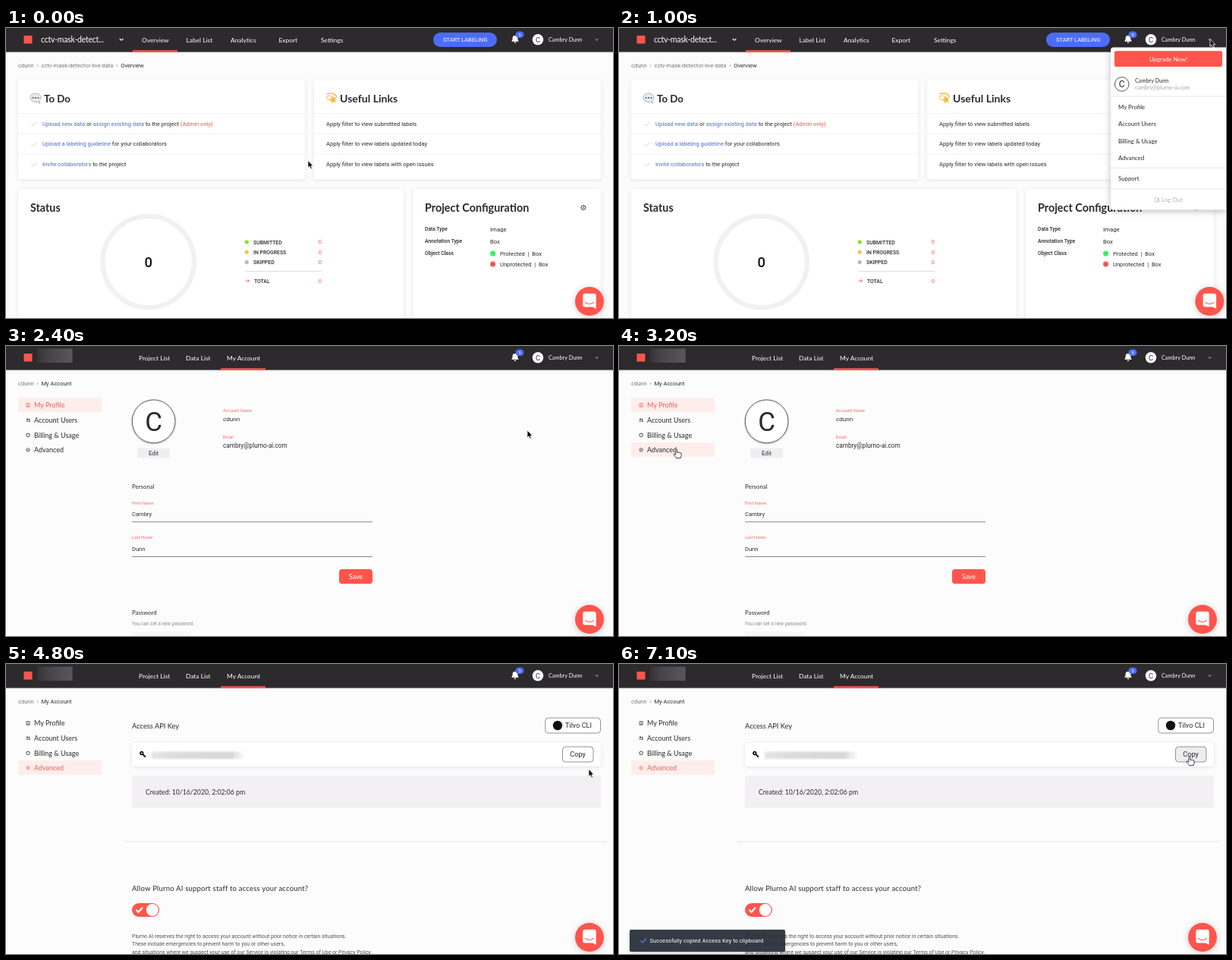
An HTML page that plays this animation: 800x382 px, repeating every 7200 ms.

```html
<!DOCTYPE html>
<html lang="en">
<head>
<meta charset="utf-8">
<title>Access key walkthrough</title>
<style>
html, body { margin: 0; width: 100%; height: 100%; overflow: hidden; background: #fdfcfd; }
svg { display: block; width: 100%; height: 100%; }
text { white-space: pre; }
.l { font-family: Lato, sans-serif; }
.r { font-family: Roboto, sans-serif; }
.card { fill: #fff; filter: drop-shadow(0 1px 2.5px rgba(60, 40, 70, .14)); }
</style>
</head>
<body>
<svg id="stage" viewBox="0 0 800 382" xmlns="http://www.w3.org/2000/svg"></svg>
<script>
const RED = '#ff554c', INK = '#2a292c', BLUE = '#4a69d8', GREY = '#8d8b90', DARK = '#2c2a2d', EDGE = '#8a888d';
const LOOP = 7200, STEP = 100;

const text = cls => (x, y, s, size, fill = INK, extra = '') =>
  `<text class="${cls}" x="${x}" y="${y}" font-size="${size}" fill="${fill}" ${extra}>${s}</text>`;
const lato = text('l'), robo = text('r');
const MID = 'text-anchor="middle"', END = 'text-anchor="end"', MED = 'font-weight="500"', BOLD = 'font-weight="700"';
const rect = (x, y, w, h, fill, extra = '') =>
  `<rect x="${x}" y="${y}" width="${w}" height="${h}" fill="${fill}" ${extra}/>`;
const card = (x, y, w, h) => `<rect class="card" x="${x}" y="${y}" width="${w}" height="${h}" rx="3"/>`;
const dot = (x, y, r, fill, extra = '') => `<circle cx="${x}" cy="${y}" r="${r}" fill="${fill}" ${extra}/>`;
const line = (d, stroke, w = 1, extra = '') =>
  `<path d="${d}" fill="none" stroke="${stroke}" stroke-width="${w}" ${extra}/>`;
const group = (id, body) => `<g id="${id}">${body}</g>`;
const span = (s, fill) => `<tspan fill="${fill}">${s}</tspan>`;
const ROUND = 'stroke-linecap="round" stroke-linejoin="round"';

function topBar() {
  return rect(0, 31, 800, 2, '#efecef') + rect(0, 0, 800, 31.6, DARK) +
    rect(23.5, 10, 11, 10.5, RED) +
    '<path d="M671 9.8c-2.4 0-3.4 1.8-3.4 3.8 0 2.6-.8 3.2-1.5 4.2h9.8c-.7-1-1.5-1.6-1.5-4.2 0-2-1-3.8-3.4-3.8zM669.6 18.6h2.8a1.4 1.4 0 0 1-2.8 0z" fill="#fff"/>' +
    rect(671.5, 4.5, 11, 8.5, '#4d6cf5', 'rx="4.2"') + robo(677, 11.2, '5', 6.2, '#fff', MID) +
    dot(701, 15.3, 7.2, '#fff') + robo(701, 18.7, 'C', 9.4, INK, MID) +
    lato(715, 18, 'Cambry Dunn', 7.3, '#fff') +
    line('M776.9 14.5l1.7 1.7 1.7-1.7', '#e4e3e5', .9);
}

function nav(items, active) {
  const [x, w] = active;
  return items.map(([at, s]) => lato(at, 18.7, s, 8.4, '#fff')).join('') + rect(x, 29.3, w, 2.6, RED);
}

function crumbs(...parts) {
  const last = parts.pop();
  return robo(16, 51.8, parts.map(p => span(p + '  ›  ', '#77757a')).join('') + span(last, INK), 7.55);
}

function taskList() {
  const link = s => span(s, BLUE);
  const rows = [
    link('Upload new data') + ' or ' + link('assign existing data') + ' to the project ' + span('(Admin only)', '#e8574f'),
    link('Upload a labeling guideline') + ' for your collaborators',
    link('Invite collaborators') + ' to the project'
  ];
  const filters = ['submitted labels', 'labels updated today', 'labels with open issues'];
  return rows.map((s, i) => {
    const y = 112.5 + i * 26.7;
    return line(`M16 ${y}H394M406 ${y}H784`, '#f2f0f3') +
      line(`M33.5 ${y + 14}l2.4 2.4 4.8-5`, '#d3d6d8') +
      robo(48, y + 16.2, s, 7.55) +
      robo(422, y + 16.2, 'Apply filter to view ' + filters[i], 7.57);
  }).join('');
}

function emoji() {
  const bubble = '<path d="M39 86.2c4.2 0 7 2.4 7 5.6 0 1.9-.9 3.4-2.4 4.4l1.4 3-4.1-1.9c-5.3.6-8.9-1.9-8.9-5.5 0-3.2 2.8-5.6 7-5.6z" fill="#e8ecee" stroke="#98a2a8" stroke-width=".8"/>' +
    [35.6, 39, 42.4].map(x => dot(x, 92, 1.05, '#4b555c')).join('');
  let star = '';
  for (let i = 0; i < 10; i++) {
    const a = i * Math.PI / 5 - 1.8, r = i % 2 ? 2.3 : 4.6;
    star += `${i ? 'L' : 'M'}${431 + r * Math.cos(a)} ${94.4 + r * Math.sin(a)}`;
  }
  return bubble + line('M435.5 91c0-4-7-6-12.5-4.2', '#f3bd45', 1.5, ROUND) +
    line('M427 95.500c-3-1-4.800-3-4.300-5.300 1.500-1.300 4.500-1.200 6.800-.2', '#f6cf72', 1.3, ROUND) +
    `<path d="${star}Z" fill="#f8b93a" stroke="#f0a630" stroke-width=".5" stroke-linejoin="round"/>`;
}

function gear(x, y) {
  let d = '';
  for (let i = 0; i < 8; i++) {
    const a = i * Math.PI / 4, c = Math.cos(a), s = Math.sin(a);
    d += `M${x + 2.6 * c} ${y + 2.6 * s}L${x + 3.7 * c} ${y + 3.7 * s}`;
  }
  return line(d, '#56545a', 1.3) + dot(x, y, 2.5, 'none', 'stroke="#56545a" stroke-width=".9"') + dot(x, y, .9, '#56545a');
}

function home() {
  const legend = [['SUBMITTED', '#8fe02f'], ['IN PROGRESS', '#f8c250'], ['SKIPPED', '#b9b7bb']];
  return lato(46, 19.3, 'cctv-mask-detect...', 10.6, '#fff', 'letter-spacing="-.28"') +
    line('M149.8 14l2.3 2.3 2.3-2.3', '#fff', 1.1) +
    nav([[179, 'Overview'], [237.5, 'Label List'], [296, 'Analytics'], [359.5, 'Export'], [415, 'Settings']], [167, 59]) +
    rect(563, 6, 84, 19, '#4d6cf9', 'rx="9.5"') + robo(605.3, 18.4, 'START LABELING', 7.5, '#fff', MID) +
    crumbs('cdunn', 'cctv-mask-detector-live-data', 'Overview') +
    card(16, 68, 378, 131.5) + card(406, 68, 378, 131.5) + card(16, 212, 508, 180) + card(536, 212, 248, 180) +
    emoji() + lato(50, 97.6, 'To Do', 13.3, INK, BOLD) + lato(440, 97.6, 'Useful Links', 14.1, INK, BOLD) +
    taskList() +
    lato(32, 242, 'Status', 14.3, INK, BOLD) +
    dot(187.7, 308, 60.2, 'none', 'stroke="#f2f1f2" stroke-width="6.4"') +
    robo(187.7, 314.7, '0', 18.4, '#111', MID + ' ' + MED) +
    legend.map(([s, c], i) => {
      const y = 282 + i * 13.3;
      return rect(314.7, y - 2.5, 5, 5, c, 'rx="1.8"') + robo(326, y + 2.7, s, 6.9, INK, MED) +
        robo(416, y + 2.2, '0', 7.5, '#ef5a50', END);
    }).join('') +
    line('M315 320.5H416', '#dddbde', .9) +
    line('M315.5 333H320.5M318.5 331l2 2-2 2', RED, .9) +
    robo(327, 335.5, 'TOTAL', 6.9, INK, MED) + robo(416, 335.5, '0', 7.5, '#ef5a50', END) +
    lato(552, 242, 'Project Configuration', 14.4, INK, BOLD) + gear(761, 236.6) +
    ['Data Type', 'Annotation Type', 'Object Class'].map((s, i) =>
      robo(552, [267, 282.8, 298.8][i], s, 6.75, INK, MED)).join('') +
    robo(638, 268.3, 'Image', 7.8) + robo(638, 284.2, 'Box', 7.7) +
    dot(641.6, 297, 3.5, '#36f25c') + robo(651, 299.8, 'Protected  |  Box', 7.6) +
    dot(641.6, 311, 3.5, '#fa5750') + robo(651, 313.8, 'Unprotected  |  Box', 7.6);
}

const menuRows = [['My Profile', 104], ['Account Users', 126.4], ['Billing &amp; Usage', 148.7], ['Advanced', 170.8], ['Support', 198.5]];

function menu() {
  return '<path class="card" d="M652 25.5H800V239.5H652a4 4 0 0 1-4-4V29.5a4 4 0 0 1 4-4z" style="filter:drop-shadow(0 2px 4px rgba(40,30,50,.3))"/>' +
    rect(653, 30.3, 142, 20.7, RED, 'rx="2"') + lato(724, 43.8, 'Upgrade Now!', 7.9, '#fff', MID) +
    dot(662.7, 74, 9.3, '#fff', 'stroke="#55535a" stroke-width="1"') + robo(662.7, 78.3, 'C', 12, INK, MID) +
    lato(680, 71.8, 'Cambry Dunn', 7.3) + lato(680, 81, 'cambry@plurno-ai.com', 7.15, '#a3a1a6') +
    line('M648 90H800M648 184.3H800M648 212H800', '#e6e4e7') +
    rect(648, 0, 152, 22.5, '#efeeef', 'id="menuHover"') +
    menuRows.map(([s, y]) => lato(658, y + 2.8, s, 7.85)).join('') +
    line('M709 223.5h-2.5v5.5h5v-5.5h-1M708.5 226.2h3M710 224.7l1.5 1.5-1.5 1.5', '#b3b1b6', .7) +
    lato(715, 229.4, 'Log Out', 7.9, '#b3b1b6');
}

const sideRows = ['My Profile', 'Account Users', 'Billing &amp; Usage', 'Advanced'];
const sideTop = i => 68 + i * 19.65;
const sideIcons = [
  '<path d="M27 75.7h4.200v4.500h-4.200z" fill="none" stroke="currentColor" stroke-width=".7"/><path d="M28.100 79.200h2M29.100 76.600v1.400" stroke="currentColor" stroke-width=".8"/>',
  '<circle cx="28" cy="96.500" r="1.100"/><circle cx="30.500" cy="96.700" r=".9"/><path d="M26 99.500q2-2.200 4 0zM30.200 99.500l-.2-1.300q1.400-.7 2.200 1.300z"/>',
  '<circle cx="29.100" cy="117.300" r="2.200" fill="none" stroke="currentColor" stroke-width=".9"/>',
  '<circle cx="29.100" cy="136.900" r="2.200" fill="none" stroke="currentColor" stroke-width=".7"/><path d="M28 136.900h2.200" stroke="currentColor" stroke-width=".8"/>'
];

function account() {
  return rect(41, 3.5, 46.5, 18.5, 'url(#smudge)') +
    nav([[175, 'Project List'], [237, 'Data List'], [291, 'My Account']], [283, 59]) +
    crumbs('cdunn', 'My Account') +
    sideRows.map((s, i) => `<g class="side">${rect(16, sideTop(i), 110, 19.2, '#fdeeec')}<g fill="currentColor">${sideIcons[i]}${
      lato(37, sideTop(i) + 13.2, s, 9, 'currentColor')}</g></g>`).join('');
}

function profile() {
  const field = (y, label, value) => lato(166, y, label, 5.9, '#f0655d') + robo(166, y + 15.4, value, 7.55) +
    line(`M166 ${y + 23.2}H483`, '#7e7c81', .9);
  return dot(194.6, 99.3, 28.4, '#fff', 'stroke="#5a585d" stroke-width="1" style="filter:drop-shadow(0 1px 1px rgba(0,0,0,.25))"') +
    robo(194.6, 111.5, 'C', 35, INK, MID) +
    rect(173, 134.5, 43, 13, '#f0eef1', 'rx="2"') + lato(194.5, 143.9, 'Edit', 7.7, INK, MID) +
    lato(286, 87.3, 'Account Name', 5.9, '#f0655d') + robo(286, 98.8, 'cdunn', 8.1) +
    lato(286, 122.3, 'Email', 5.9, '#f0655d') + robo(286, 133.8, 'cambry@plurno-ai.com', 8.2) +
    lato(166, 188, 'Personal', 7.9) +
    field(208.5, 'First Name', 'Cambry') + field(254.3, 'Last Name', 'Dunn') +
    rect(439, 294, 44, 19.3, RED, 'rx="4"') + lato(461, 306.8, 'Save', 8.7, '#fff', MID) +
    lato(166, 354, 'Password', 7.8) + robo(166, 368.4, 'You can set a new password.', 6.35, GREY) +
    rect(166, 376, 77, 8, '#f8f6f8');
}

function advanced() {
  const small = (y, s) => robo(166, y, s, 6.95, '#504e53');
  return lato(166, 85, 'Access API Key', 9.3) +
    rect(710.8, 71, 72.7, 20, '#fff', `rx="4" stroke="${EDGE}" stroke-width=".9"`) +
    dot(727, 81, 6.2, '#111') + robo(737, 84.3, 'Tilvo CLI', 9.1) +
    card(166, 104, 618, 31) +
    dot(178.8, 117.5, 1.8, 'none', 'stroke="#111" stroke-width="1.7"') + line('M180 118.700l3.800 3.800', '#111', 1.8) +
    rect(192, 115.5, 124, 9.5, 'url(#keyBlur)', 'style="filter:blur(1.3px)"') +
    `<rect id="copy" x="733.5" y="109" width="40.5" height="20" rx="4" stroke="${EDGE}" stroke-width=".9"/>` +
    robo(753.6, 122.4, 'Copy', 9.2, INK, MID) +
    rect(166, 147, 618, 42.3, '#f2f0f2') + lato(184, 171.8, 'Created: 10/16/2020, 2:02:06 pm', 8.73) +
    line('M155.5 234H792', '#e6e4e7') +
    lato(166, 299, 'Allow Plurno AI support staff to access your account?', 9.53, INK, 'letter-spacing=".2"') +
    rect(166, 315, 36, 18, RED, 'rx="9"') + dot(192.8, 324, 8, '#fff') +
    line('M171.5 323.800l3 3 5.500-6', '#fff', 2.2) +
    small(361.3, 'Plurno AI reserves the right to access your account without prior notice in certain situations.') +
    small(371.4, 'These include emergencies to prevent harm to you or other users,') +
    small(381.5, 'and situations where we suspect your use of our Service is violating our Terms of Use or Privacy Policy.');
}

function toast() {
  return rect(14, 350, 205, 29, '#2a313c', 'rx="2" opacity=".95" style="filter:drop-shadow(0 1px 2px rgba(0,0,0,.25))"') +
    line('M28.5 364.5l2.5 2.5 5-5.5', '#5b78f5', 1.2) +
    robo(40.5, 367, 'Successfully copied Access Key to clipboard', 7.58, '#fff');
}

function chat() {
  return dot(769, 360, 19, RED, 'style="filter:drop-shadow(0 1px 4px rgba(0,0,0,.2))"') +
    '<path d="M763 349.800h12a2.700 2.700 0 0 1 2.700 2.700v17.200l-4.700-2.300h-10a2.700 2.700 0 0 1-2.700-2.700v-12.200a2.700 2.700 0 0 1 2.700-2.700z" fill="#fff"/>' +
    line('M763.5 361.5q5.500 4 11 0', RED, 1.1, ROUND);
}

function pointers() {
  const edge = 'stroke-linejoin="round"';
  return `<path id="arrow" d="M0 0V9.8l2.2-2 1.5 3.5 1.7-.7-1.5-3.4h3z" fill="#000" stroke="#fff" stroke-width=".8" ${edge}/>` +
    `<path id="hand" d="M-1.2.8c0-1.300 2-1.300 2 0V4c.3-.8 1.800-.7 1.900.3.400-.8 1.800-.6 1.800.4.500-.6 1.600-.4 1.600.7v2.500c0 1.300-.9 1.800-.9 3.300H-.6c-.2-1.500-2.600-3.300-3.200-4.700-.4-1 .8-1.600 1.500-.8l1.100 1.200z" fill="#fff" stroke="#111" stroke-width=".8" ${edge}/>`;
}

const stops = list => list.map(([o, c, a = 1]) => `<stop offset="${o}" stop-color="${c}" stop-opacity="${a}"/>`).join('');
document.getElementById('stage').innerHTML =
  `<defs><linearGradient id="smudge">${stops([[0, '#343235'], [.3, '#454346'], [1, '#59575b']])}</linearGradient>` +
  `<linearGradient id="keyBlur">${stops([[0, '#e6e4e7'], [.3, '#dcdadd'], [.85, '#d8d6d9'], [1, '#e2e0e3', 0]])}</linearGradient></defs>` +
  rect(0, 0, 800, 382, '#fdfcfd') + topBar() + group('home', home()) + group('account', account()) +
  group('profile', profile()) + group('advanced', advanced()) + group('menu', menu()) +
  group('toast', toast()) + group('chat', chat()) + group('cursor', pointers());

const el = id => document.getElementById(id);
const show = (node, on) => node.setAttribute('display', on ? 'inline' : 'none');
const move = (id, x, y) => el(id).setAttribute('transform', `translate(${x} ${y})`);
const sides = [...document.querySelectorAll('.side')];

// Cursor stops: time, x, y
const path = [
  [0, 398, 174.5], [100, 398, 174.5], [700, 779, 14.5], [1100, 779, 14.5], [1800, 687, 111], [2400, 687, 111],
  [3100, 76, 136.5], [3600, 76, 136.5], [4600, 768, 138.5], [4800, 768, 138.5], [5200, 752, 122.5], [LOOP, 752, 122.5]
];
const OPEN = 800, TO_PROFILE = 2300, TO_ADVANCED = 3500, COPIED = 5400;

function cursorAt(t) {
  const i = path.findIndex(p => p[0] > t), a = path[i - 1], b = path[i];
  const u = (t - a[0]) / (b[0] - a[0]), k = u * u * (3 - 2 * u);
  return [a[1] + (b[1] - a[1]) * k, a[2] + (b[2] - a[2]) * k];
}

function draw(t) {
  const [x, y] = cursorAt(t);
  const isHome = t < TO_PROFILE, isAdvanced = t >= TO_ADVANCED, isOpen = isHome && t >= OPEN;

  show(el('home'), isHome);
  show(el('account'), !isHome);
  show(el('profile'), !isHome && !isAdvanced);
  show(el('advanced'), isAdvanced);
  show(el('menu'), isOpen);
  move('chat', isOpen ? 9.4 : 0, 0);

  const row = isOpen && x > 648 ? menuRows.find(r => Math.abs(y - r[1]) < 11.2) : null;
  show(el('menuHover'), row);
  if (row) el('menuHover').setAttribute('y', row[1] - 11.2);

  const over = !isHome && x > 16 && x < 126 ? Math.floor((y - 68) / 19.65) : -1;
  const active = isAdvanced ? 3 : 0;
  sides.forEach((g, i) => {
    show(g.firstChild, i === active || i === over);
    g.setAttribute('color', i === active ? '#f25c53' : INK);
  });

  const onCopy = isAdvanced && x > 733 && x < 774 && y > 109 && y < 129;
  el('copy').setAttribute('fill', onCopy ? '#eeecee' : '#fff');

  const slide = Math.min(1, Math.max(0, (t - COPIED + STEP) / 300));
  show(el('toast'), t >= COPIED);
  move('toast', -220 * (1 - slide) ** 2, 0);

  const onUpgrade = isOpen && x > 653 && y > 30 && y < 51;
  const isHand = row || onUpgrade || onCopy || (over >= 0 && over < 4);
  show(el('hand'), isHand);
  show(el('arrow'), !isHand);
  move('cursor', x, y);
}

const start = performance.now();
function tick() {
  const t = (performance.now() - start) % LOOP;
  draw(Math.floor(t / STEP) * STEP);
  requestAnimationFrame(tick);
}
tick();
</script>
</body>
</html>
```
